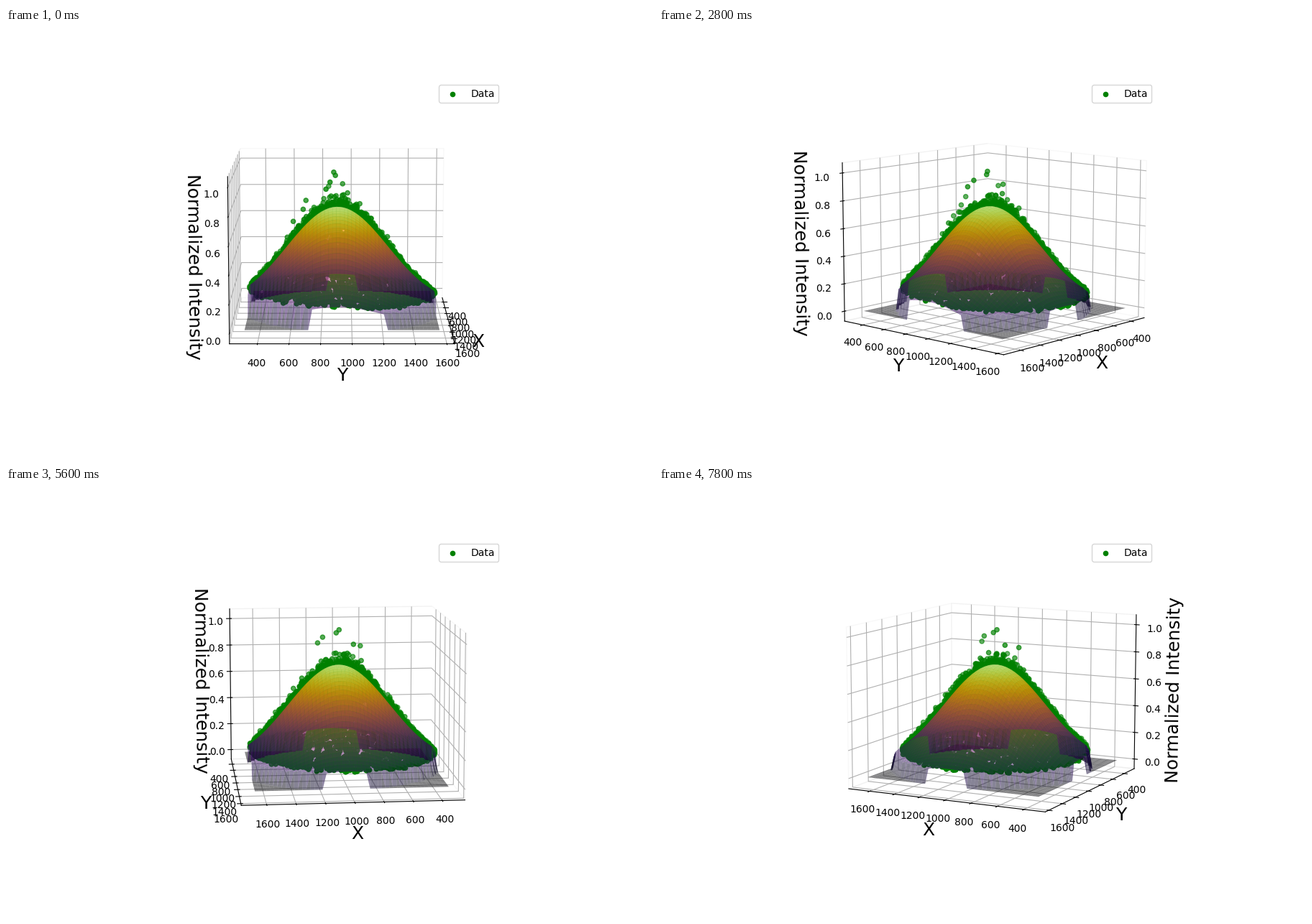
A matplotlib script that plays this animation: 900x600 px, repeating every 8 s.

```python
import numpy as np
import matplotlib.pyplot as plt
from matplotlib.animation import FuncAnimation

FRAMES = 40
INTERVAL = 200
DEG_PER_FRAME = 3

X_LIM, Y_LIM, Z_LIM = (243, 1772), (223, 1649), (-0.073, 1.073)
X_DATA, Y_DATA = (340, 1674), (314, 1558)
PEAK, X0, Y0 = 0.75, 1027, 905
SIGMA_X, SIGMA_Y = 368, 343


def bell(x, y):
    return PEAK * np.exp(-((x - X0) / SIGMA_X) ** 2 / 2 - ((y - Y0) / SIGMA_Y) ** 2 / 2)


def fitted_surface(n=50):
    """Bell on a grid, dropped to zero outside a rounded aperture."""
    u, v = np.meshgrid(np.linspace(0, 1, n), np.linspace(0, 1, n))
    x = X_DATA[0] + u * (X_DATA[1] - X_DATA[0])
    y = Y_DATA[0] + v * (Y_DATA[1] - Y_DATA[0])
    du = (u - 0.516 - 0.026 * (v - 0.5)) / 0.523
    dv = (v - 0.494 - 0.09 * (u - 0.5) ** 2) / 0.518
    return x, y, np.where(du ** 2 + dv ** 2 < 1, bell(x, y), 0)


def noisy_points(n=5500):
    """Uniform samples in an elliptical disc, with intensity-scaled noise."""
    rng = np.random.default_rng(12)
    r, a = 0.5 * np.sqrt(rng.random(n)), rng.uniform(0, 2 * np.pi, n)
    x = np.mean(X_DATA) + r * np.cos(a) * (X_DATA[1] - X_DATA[0])
    y = np.mean(Y_DATA) + r * np.sin(a) * (Y_DATA[1] - Y_DATA[0])
    z = bell(x, y) * (1 + 0.055 * np.clip(rng.normal(size=n), -2.2, 2.9))
    # stray bright samples: offsets from the box centre, and height
    stray = np.array([
        (0.012, -0.046, 1.000), (0.029, -0.037, 0.980), (0.102, -0.066, 0.945),
        (-0.063, 0.003, 0.903), (-0.110, -0.075, 0.877), (0.128, -0.088, 0.900),
        (0.050, -0.270, 0.654), (0.045, -0.215, 0.740), (0.024, -0.200, 0.800),
    ])
    sx = np.mean(X_LIM) + stray[:, 0] * 1285
    sy = np.mean(Y_LIM) + stray[:, 1] * 1198
    return np.r_[x, sx], np.r_[y, sy], np.r_[z, stray[:, 2]]


fig = plt.figure(figsize=(9, 6), dpi=100)
ax = fig.add_subplot(projection="3d", computed_zorder=False)

ax.scatter(*noisy_points(), c="g", label="Data", zorder=1)
ax.plot_surface(*fitted_surface(), cmap="inferno", alpha=0.5, zorder=2)

ax.set(xlim=X_LIM, ylim=Y_LIM, zlim=Z_LIM)
ax.set_xticks(range(400, 1601, 200))
ax.set_yticks(range(400, 1601, 200))
ax.set_zticks(np.arange(6) / 5)
ax.set_xlabel("X", fontsize=18)
ax.set_ylabel("Y", fontsize=18)
ax.set_zlabel("Normalized Intensity", fontsize=18)
for axis in (ax.xaxis, ax.yaxis, ax.zaxis):
    axis.pane.fill = False
ax.legend(loc="upper right")


def update(i):
    # the tiny offset keeps the same walls at the back when seen square on
    ax.view_init(elev=10, azim=DEG_PER_FRAME * i + 1e-3)
    return ()


anim = FuncAnimation(fig, update, frames=FRAMES, interval=INTERVAL,
                     init_func=lambda: update(0), repeat=True, repeat_delay=0)
plt.show()
```
